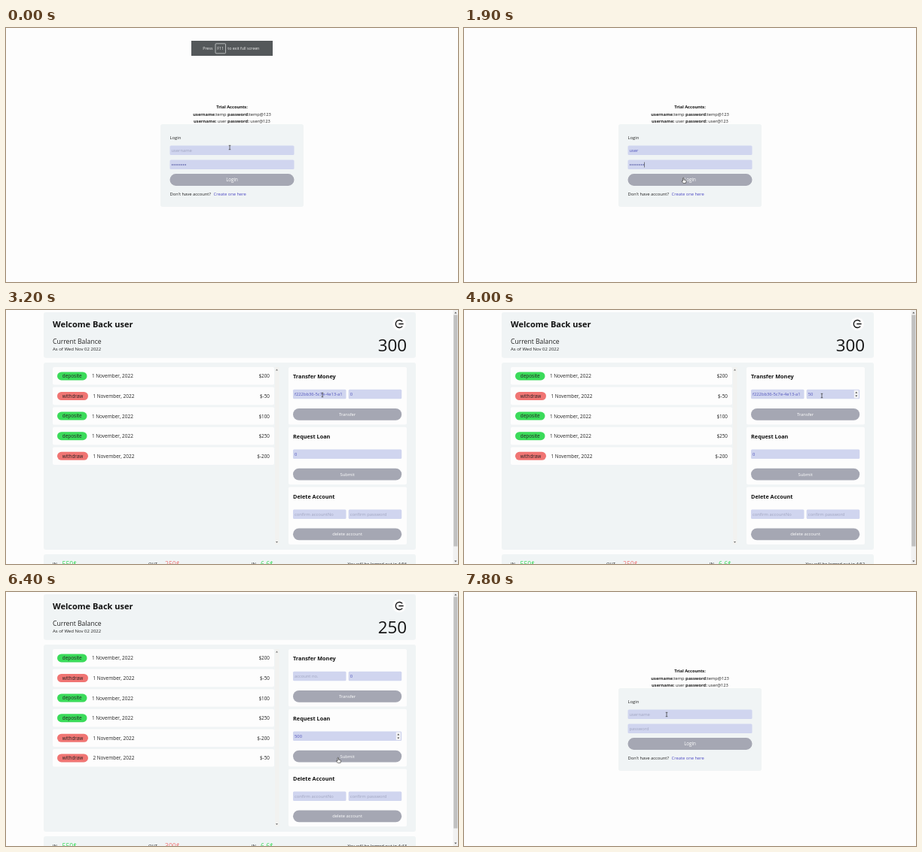
Animation, 600 px wide and 338 px high, one loop 8 s. Source, as an HTML page:

```html
<!DOCTYPE html>
<html lang="en">
<head>
<meta charset="utf-8">
<title>Online banking</title>
<style>
  html, body { margin: 0; width: 100%; height: 100%; overflow: hidden; background: #fdfdfd; }
  svg { display: block; width: 600px; height: 338px; font-family: "Open Sans", "Noto Sans", sans-serif; }
</style>
</head>
<body>
<svg id="stage" viewBox="0 0 600 338"></svg>
<script>
const LOOP = 8000, STEP = 100;
const PAPER = '#fdfdfd', PANEL = '#f0f4f5', FIELD = '#d0d5ef', BUTTON = '#a5a7b3';
const INK = '#222', HINT = '#a0a5c0', VALUE = '#5356bd', GREEN = '#3bdb5a', RED = '#f07573';

// Moments at which the page changes.
const T = { name: 500, pass: 1200, open: 2000, paste: 3100, amount: 3800, sent: 4400,
            loan: 5600, granted: 6600, close: 7300 };

// Pointer stops: time, x, y.
const PATH = [
  [0, 297, 159], [800, 297, 160], [1200, 262, 182], [1400, 262, 182], [1800, 292, 203],
  [2000, 292, 203], [2500, 408, 142], [2900, 420, 113], [3300, 420, 113], [3700, 475, 114],
  [4000, 475, 114], [4300, 447, 140], [4900, 447, 140], [5300, 430, 192], [5900, 430, 192],
  [6200, 441.5, 224], [6700, 441.5, 224], [7200, 522, 19], [7300, 522, 19],
  [7600, 302, 150], [7800, 269, 163], [8000, 269, 163]
];

const rect = (x, y, w, h, fill, r = 0) =>
  `<rect x="${x}" y="${y}" width="${w}" height="${h}" rx="${r}" fill="${fill}"/>`;
const text = (x, y, s, size = 5.8, fill = INK, more = '') =>
  `<text x="${x}" y="${y}" font-size="${size}" fill="${fill}" ${more}>${s}</text>`;
const path = (d, more) => `<path d="${d}" ${more}/>`;
const bold = s => `<tspan font-weight="700">${s}</tspan>`;
const MID = 'text-anchor="middle"', END = 'text-anchor="end"', BOLD = 'font-weight="700"';

let hot = [];

function field(x, y, w, hint, value) {
  hot.push([x, y, w, 12.5, 'beam']);
  return rect(x, y, w, 12.5, FIELD, 1.5) +
    text(x + 2, y + 8.4, value || hint, 5.8, value ? VALUE : HINT);
}

function button(x, y, w, label, size) {
  hot.push([x, y, w, 15.8, 'hand']);
  return rect(x, y, w, 15.8, BUTTON, 7.9) + text(x + w / 2, y + 10, label, size, '#fff', MID);
}

const spinner = (x, y) => rect(x, y, 6, 10.5, '#f4f4f6', .5) +
  path(`M${x + 1.6} ${y + 4}l1.4-2 1.4 2zM${x + 1.6} ${y + 6.8}l1.4 2 1.4-2z`, 'fill="#444"');

function banner(t) {
  const alpha = Math.max(0, Math.min(1, (600 - t) / 300));
  return `<g opacity="${alpha}">` + rect(246, 17, 108, 20, '#54585a') +
    '<rect x="278" y="20.8" width="13.5" height="13" rx="1" fill="none" stroke="#dfe1e1" stroke-width=".7"/>' +
    text(261.3, 29.4, 'Press', 5.3, '#eee') + text(284.7, 29.4, 'F11', 5.3, '#eee', MID) +
    text(294.3, 29.4, 'to exit full screen', 5.3, '#eee') + '</g>';
}

function login(t) {
  const again = t >= T.close;
  const typed = again ? 0 : Math.max(0, Math.floor((t - T.name) / STEP) + 1);
  let s = text(300, 107.2, 'Trial Accounts:', 5.7, '#111', MID + ' ' + BOLD) +
    text(300, 116.7, `${bold('username:')}temp ${bold('password:')}temp@123`, 5.7, INK, MID) +
    text(300, 126.1, `${bold('username:')} user ${bold('password:')} user@123`, 5.7, INK, MID) +
    rect(205, 128, 190, 110, PANEL, 3) +
    text(217.5, 148.2, 'Login') +
    field(217.5, 156.5, 165, 'username', 'user'.slice(0, typed)) +
    field(217.5, 175.5, 165, again ? 'password' : '') +
    button(217.5, 194.1, 165, 'Login', 6.2) +
    text(217.5, 223.2, "Don't have account?") +
    text(275.5, 223.2, 'Create one here', 5.8, '#4f4bc4');
  if (!again) {
    for (let i = 0; i < 8; i++) s += `<circle cx="${220.7 + i * 2.5}" cy="182" r=".8" fill="#43479a"/>`;
    if (t >= T.pass) s += rect(239.3, 178.5, .6, 7, '#333');
    s += banner(t);
  }
  return s;
}

function row(amount, i) {
  const y = 76 + i * 26.6, out = amount < 0, w = out ? 41 : 39.5;
  const day = i < 5 ? 1 : 2;
  return rect(62, y, 294, 23.6, PAPER, 2) +
    rect(68, y + 6.4, w, 11, out ? RED : GREEN, 5.5) +
    text(68 + w / 2, y + 14.1, out ? 'withdraw' : 'deposite', 6.4, INK, MID) +
    text(68 + w + 6.4, y + 14.3, `${day} November, 2022`, 6.45) +
    text(350, y + 14.3, '$' + amount, 6.4, INK, END);
}

const card = (y, title) => rect(375, y, 157, 76.5, PAPER, 2) +
  text(381, y + 14.9, title, 7.3, '#111', BOLD);

function bank(t) {
  const sent = t >= T.sent, granted = t >= T.granted;
  const rows = [200, -50, 100, 250, -200];
  if (sent) rows.push(-50);
  if (granted) rows.push(500);
  const sum = sign => rows.reduce((n, a) => n + (a * sign > 0 ? a * sign : 0), 0);
  const filling = t >= T.amount - 200 && !sent;
  const lending = t >= T.loan - 200 && !granted;
  const keyed = (s, from) => s.slice(0, Math.max(0, Math.floor((t - from) / STEP) + 1)) || '0';
  const left = 300 - Math.floor((t - T.open) / 250);
  const clock = Math.floor(left / 60) + ':' + String(left % 60).padStart(2, '0');
  hot.push([513, 9, 18, 18, 'hand']);

  return rect(50, 3, 494, 60.8, PANEL, 3) +
    text(62, 23, 'Welcome Back user', 11, '#111', BOLD) +
    text(62, 44.5, 'Current Balance', 8.65) +
    text(62, 54, 'As of Wed Nov 02 2022', 6) +
    text(532, 55.3, granted ? 750 : sent ? 250 : 300, 22.3, '#111', END) +
    `<circle cx="522" cy="18.5" r="8.8" fill="${PAPER}"/>` +
    path('M526.2 15.4A5 5 0 1 0 526.2 21.6M521.3 18.5H527.6', 'fill="none" stroke="#111" stroke-width="1.3"') +
    rect(50, 70, 494, 249, PANEL, 3) +
    rows.map(row).join('') +
    rect(357, 76, 5.5, 236, '#f2f2f0') +
    path('M358 80.5l1.5-2 1.5 2zM358 308l1.5 2 1.5-2z', 'fill="#777"') +
    card(76, 'Transfer Money') +
    field(381, 105.8, 70.5, 'account no.', t >= T.paste && !sent ? 'f222bb36-5c7e-4e13-a1' : '') +
    field(454.7, 105.8, 70.5, '', filling ? keyed('50', T.amount) : '0') +
    (filling ? spinner(517.8, 106.8) : '') +
    button(381, 131, 144.2, 'Transfer') +
    card(155.8, 'Request Loan') +
    field(381, 185.6, 144.2, '', lending ? keyed('500', T.loan) : '0') +
    (lending ? spinner(517.8, 186.6) : '') +
    button(381, 210.7, 144.2, 'Submit') +
    card(235.6, 'Delete Account') +
    field(381, 265.4, 70.5, 'confirm accountNo') +
    field(454.7, 265.4, 70.5, 'confirm password') +
    button(381, 290.4, 144.2, 'delete account') +
    rect(50, 325, 494, 20, PANEL, 3) +
    text(62, 340.3, 'IN') + text(74.5, 340.8, sum(1) + '$', 8.6, GREEN) +
    text(189, 340.3, 'OUT') + text(211, 340.8, sum(-1) + '$', 8.6, RED) +
    text(326, 340.3, 'IN') + text(338, 340.8, '6.6$', 8.6, GREEN) +
    text(532, 340.3, 'You will be logged out in ' + clock, 5.8, INK, END) +
    rect(593.5, 0, 6.5, 338, '#f1f1f1') + rect(594.2, 6.5, 5.2, 308, '#c1c1c1') +
    path('M595.2 4.4l1.6-2 1.6 2zM595.2 333.6l1.6 2 1.6-2z', 'fill="#555"');
}

function pointer(t) {
  const i = Math.max(1, PATH.findIndex(p => p[0] >= t));
  const [t0, x0, y0] = PATH[i - 1], [t1, x1, y1] = PATH[i];
  const u = (t - t0) / (t1 - t0), e = u * u * (3 - 2 * u);
  const x = x0 + (x1 - x0) * e, y = y0 + (y1 - y0) * e;
  const hit = hot.find(([l, top, w, h]) => x >= l && x <= l + w && y >= top && y <= top + h);
  const line = 'stroke="#222" stroke-width=".6" stroke-linejoin="round"';
  const shapes = {
    beam: path('M-1.3-2.7H1.3M0-2.7V2.7M-1.3 2.7H1.3', 'fill="none" stroke="#333" stroke-width=".7"'),
    hand: path('M-1.4-3.4q.7-.7 1.3 0v2.5l2.6.6q.6.3.5 1l-.5 2.7h-3.6l-2-2.6q.3-1 1.7 0z', 'fill="#fff" ' + line),
    arrow: path('M0 0V6.2L1.4 4.9 2.4 7 3.4 6.5 2.5 4.5H4.4Z', 'fill="#fff" ' + line)
  };
  return `<g transform="translate(${x} ${y})">${shapes[hit ? hit[4] : 'arrow']}</g>`;
}

const stage = document.getElementById('stage');
let shown = -1;

function draw(now) {
  const t = Math.floor(now % LOOP / STEP) * STEP;
  if (t !== shown) {
    shown = t;
    hot = [];
    const page = t >= T.open && t < T.close ? bank(t) : login(t);
    stage.innerHTML = rect(0, 0, 600, 338, PAPER) + page + pointer(t);
  }
  requestAnimationFrame(draw);
}
draw(0);
</script>
</body>
</html>
```
